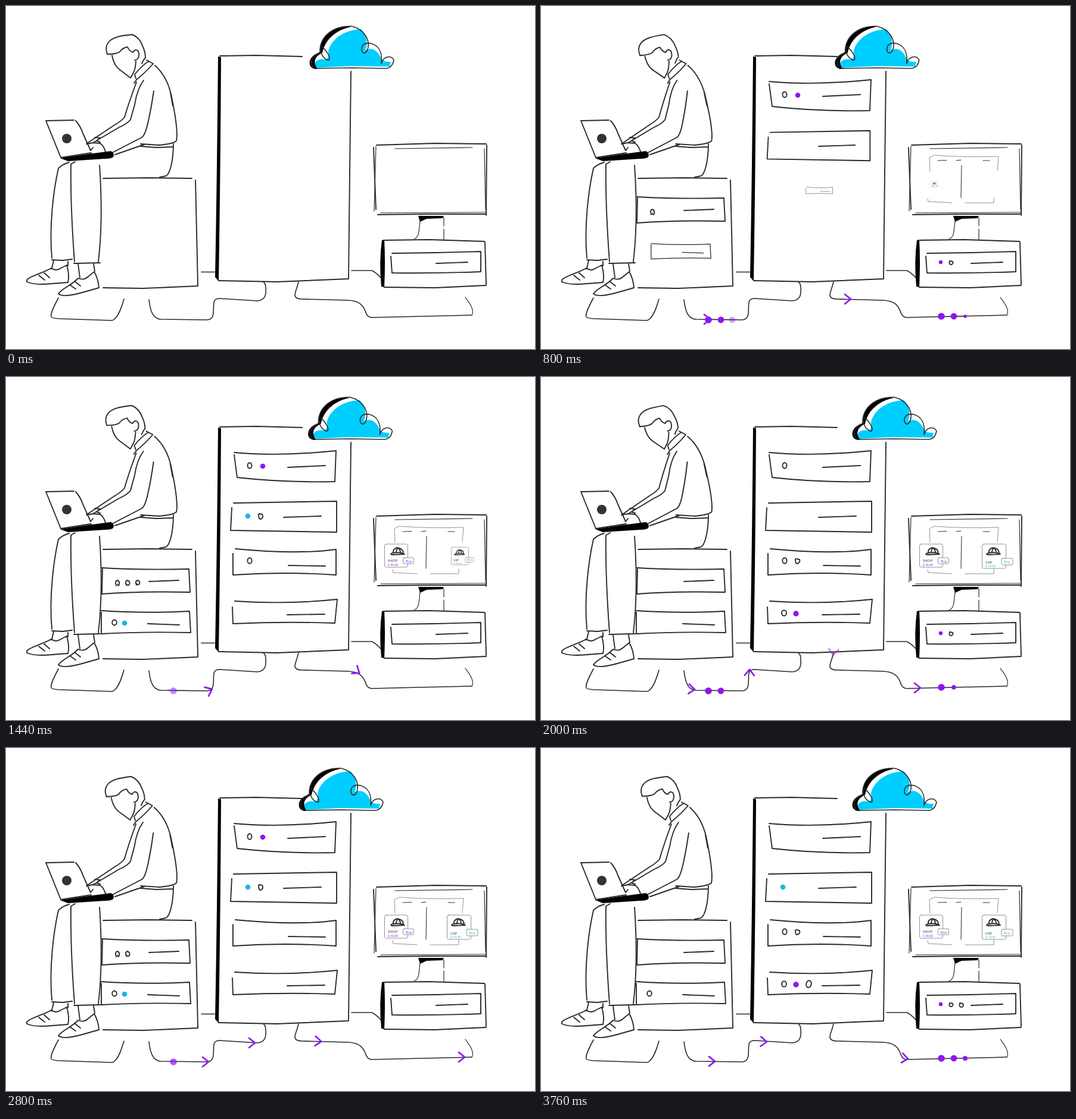
Recreate the animation shown at these times as an HTML page. Size 888 by 577 pixels, loop 3840 ms.

```html
<!DOCTYPE html>
<html lang="en">
<head>
<meta charset="utf-8">
<title>Server room</title>
<style>
html, body { margin: 0; width: 100%; height: 100%; overflow: hidden; background: #fff; }
svg { display: block; width: 888px; height: 577px; }
path, ellipse, rect { fill: none; stroke: #2a2a2a; stroke-width: 1.9; stroke-linecap: round; stroke-linejoin: round; }
.light path { stroke-width: 1.2; }
.cables path { stroke-width: 1.6; }
.fill { fill: #000; stroke: none; }
.thin path, .thin rect { stroke: #777; stroke-width: .8; }
.thin .dark { stroke: #333; stroke-width: 1.1; }
.thin .tag { fill: #fff; }
.purple { fill: #8f16f0; stroke: none; }
.cyan { fill: #18b4e8; stroke: none; }
.arrow { stroke: #8f16f0; stroke-width: 2.7; }
text { font: 6px "Open Sans", sans-serif; fill: #222; }
.price { font-size: 5px; }
</style>
</head>
<body>
<svg viewBox="0 0 888 577">
  <defs>
    <path id="cap" class="dark" d="M-8 -3C-9 -10 -2 -13 2 -11C7 -10 9 -6 9 -2C4 -4 -3 -4 -8 -3ZM-8 -3C-13 -2 -13 0 -9 0L11 -1M0 -11C-3 -9 -3 -6 -3 -4M1 -11C4 -8 4 -6 4 -4"/>
  </defs>

  <g class="cables">
    <path d="M328 447.500H350M580 445H614Q621 448 630 458"/>
    <path d="M88 491C80 506 74 518 76 523Q77 525 88 526L178 529C188 526 194 507 198 493"/>
    <path d="M240 494C242 512 246 526 260 527L338 528C352 527 347 510 349 499Q350 492 358 492L422 496C436 495 437 484 436 474Q436 467 432 464"/>
    <path d="M491 464C488 477 485 481 485 487Q486 493 497 493L574 495C593 496 599 503 603 513Q606 524 614 524L782 520"/>
  </g>
  <g class="light"><path d="M782 520Q784 518 783 511C781 502 775 496 771 490"/></g>

  <!-- box and tower -->
  <path d="M163 290L240 289L312 290M318 293L320 380L322 470M163 474L230 475L322 471"/>
  <path class="fill" d="M356 85L361 86Q360 280 357 463L351 456Q354 300 356 85Z"/>
  <path d="M359 84L420 83L497 85M579 110L577 280L575 459M357 462L455 464L575 459"/>

  <g data-pop="80" data-center="468 150">
    <path d="M383 127Q460 134 554 124L552 176Q470 178 388 169L383 131M473 152L536 149"/>
    <g data-blink="1920 0 1700 0 300">
      <ellipse cx="409" cy="149" rx="3.500" ry="4.800"/>
      <circle class="purple" cx="431" cy="150" r="4.300"/>
    </g>
  </g>
  <g data-pop="355" data-center="466 235">
    <path d="M382 212L555 209V261L377 258L379 220M466 236L529 234"/>
    <g data-blink="1440 840 920 0 280">
      <circle class="cyan" cx="406" cy="234" r="4.300"/>
      <path d="M424 231Q424 240 428 239Q433 236 430 231L425 230"/>
    </g>
  </g>
  <g data-pop="630" data-center="467 310">
    <path d="M385 289Q490 299 554 290V333Q470 327 381 333V297M474 317L536 318"/>
    <g data-blink="1920 1280 1140 0 400">
      <ellipse cx="409" cy="309" rx="3.600" ry="4.800"/>
      <path d="M427 306Q427 315 430 314Q436 312 434 307L429 306"/>
    </g>
  </g>
  <g data-pop="905" data-center="468 395">
    <path d="M384 377Q470 383 556 374L552 414Q470 411 381 415L380 387M472 400L535 399"/>
    <g data-blink="1440 240 1000 0 240 600">
      <ellipse cx="408" cy="397" rx="4" ry="4.800"/>
      <circle class="purple" cx="428" cy="398" r="4.700"/>
      <ellipse cx="449.500" cy="397" rx="4.200" ry="6" transform="rotate(12 449 397)"/>
    </g>
  </g>
  <g data-pop="220" data-center="235 343">
    <path d="M161 321Q230 325 307 323L309 362Q230 360 161 365L162 321M240 344L290 342"/>
    <g data-blink="1920 640 1100 0 200 400">
      <path d="M185 351Q182 343 187 342Q191 343 190 349Q188 353 187 349"/>
      <path d="M202 350Q199 343 204 342Q209 344 207 349Q204 352 203 349"/>
      <path d="M219 350Q216 343 221 342Q226 344 224 348Q221 351 220 348"/>
    </g>
  </g>
  <g data-pop="495" data-center="235 413">
    <path d="M160 393Q230 398 308 394L310 430Q230 428 160 432V396M238 415L291 417"/>
    <g data-blink="1440 840 920 0 280">
      <ellipse cx="182" cy="413" rx="3.800" ry="4.500"/>
      <circle class="cyan" cx="199" cy="414" r="4.300"/>
    </g>
  </g>

  <!-- desktop computer -->
  <path d="M622 234L720 231L806 232M807 234L806 352M624 351L710 350L806 350M617 238L621 342"/>
  <g class="light">
    <path d="M653 240L783 238M629 348L805 347M803 240L805 342M621 236L618 345"/>
    <path d="M695 362C693 378 694 389 685 392M735 356V370M735 375V393"/>
  </g>
  <path class="fill" d="M692 353L735 353L733 357L706 358L695 363Z"/>
  <path class="fill" d="M631 394L635 393Q637 430 635 473L630 472Q626 430 631 394Z"/>
  <path d="M636 394L710 393L803 396M804 397L806 468M635 473L720 474L806 470"/>
  <path d="M648 416L720 415L797 413V447Q720 450 648 449L646 421M722 433L775 431"/>
  <g data-blink="1440 240 1000 0 240 600">
    <circle class="purple" cx="671" cy="431" r="3.300"/>
    <path d="M686 429Q684 435 689 435Q693 433 691 430L687 429"/>
    <path d="M703 429Q701 436 706 436Q711 434 708 430L704 429"/>
  </g>

  <!-- web shop -->
  <g class="thin">
    <g data-pop="160" data-center="709 291">
      <path d="M653 278L652 255L660 251Q710 255 768 253L766 277M649 324L650 329L690 331M712 331L760 331V323"/>
      <path class="dark" d="M706 268L705 322M666 260L681 259.500M697 260L705 259M742 260H753"/>
    </g>
    <g data-pop="635" data-center="661 300">
      <rect x="635.500" y="281" width="39" height="39" rx="3"/>
      <use href="#cap" x="658" y="299"/>
      <text x="641" y="311">SHOP</text>
      <text x="641" y="318" class="price purple">$ 30.00</text>
      <rect class="tag" x="666.500" y="304" width="18" height="10" rx="2"/>
      <text x="671" y="311.500" class="purple">Buy</text>
    </g>
    <g data-pop="1115" data-center="766 300">
      <rect x="740.500" y="281" width="40" height="41" rx="3"/>
      <use href="#cap" x="760" y="299"/>
      <text x="746" y="314">CAP</text>
      <text x="746" y="320" class="price cyan">$ 10.00</text>
      <rect class="tag" x="773" y="305" width="19" height="11" rx="2"/>
      <text x="777" y="312.500" class="cyan">Buy</text>
    </g>
  </g>

  <!-- man with laptop -->
  <g id="head">
    <path d="M170 81C167 73 168 66 172 61C179 52 193 50 212 48C222 52 227 60 230 69Q234 78 234 87Q231 90 228 97"/>
    <path d="M170 81Q186 81 191 77Q196 70 204 69Q207 76 213 78Q217 71 222 76C225 84 222 91 216 91"/>
    <path d="M178 83C181 99 187 105 196 111L209 121L214 112Q217 107 218 93"/>
  </g>
  <g id="torso">
    <path d="M236 91L247 97Q235 111 219 124L215 130M240 93Q230 98 216 115L218 122"/>
    <path d="M250 100C267 115 275 134 279 158C285 188 289 213 286 227Q280 232 257 234L226 232M276 146L280 168"/>
    <path d="M219 128Q206 163 199 187Q193 194 184 199L136 231M231 125Q220 140 216 166L209 191Q204 198 190 204L146 230"/>
    <path d="M248 143Q244 171 239 193Q234 217 228 221L176 248"/>
  </g>
  <path d="M226 236L252 238L280 237M281 232C281 260 275 284 268 286L258 288M232 233L183 250"/>
  <path d="M149 221L158 222L152 227L158 229M135 232L146 230L158 231Q164 235 167 245M146 238L142 243"/>
  <path d="M67 193L92 255L143 247M67 193L114 192M117 193Q125 202 129 214L142 243"/>
  <circle cx="102" cy="223" r="8" fill="#333"/>
  <path class="fill" d="M91 256L138 249L176 244Q183 248 180 254Q177 257 166 257L104 261Z"/>
  <path d="M106 263Q95 266 88 273C80 308 72 370 77 424M116 262L109 266C108 330 112 390 115 430"/>
  <path d="M157 268C161 326 161 380 155 430M77 427L95 428L111 426M114 433L158 432"/>
  <path d="M80 428L77 441M104 430L104 437M121 434L124 457M147 434L149 446"/>
  <path d="M35 461C39 454 63 449 76 441Q84 447 92 441L102 436Q107 453 104 465L78 467Q48 470 35 464ZM55 453L65 461M64 449L73 457"/>
  <path d="M88 484C94 475 110 470 121 458Q130 462 137 456L148 447Q155 459 156 474L128 482Q96 491 88 484ZM107 469L117 476M115 463L125 471"/>

  <g id="arrows"></g>
  <g id="dots"></g>

  <g id="cloud">
    <path style="fill:#fff;stroke:none" d="M514 104Q508 88 527 79C526 52 548 34 580 34C600 38 609 54 608 64Q628 66 630 95Q640 80 651 92Q648 105 638 105Z"/>
    <path style="fill:#00ceff;stroke:none" d="M519 104C515 93 525 88 535 90Q543 90 541 76C545 58 565 40 596 39C608 52 607 66 603 74Q621 67 630 89Q632 94 646 94L644 102L580 101Z"/>
    <path class="fill" d="M523 106C505 108 504 84 527 78C526 52 548 33 580 35C555 40 536 55 531 79C519 84 514 94 523 106Z"/>
    <g class="cables">
      <path d="M516 104Q506 88 527 78C526 52 548 33 580 34C601 39 610 56 608 69C606 80 600 82 597 75C596 64 604 61 613 63C627 67 632 80 630 97C634 83 647 83 651 91Q649 103 639 105L580 104L520 105"/>
      <path d="M528 67C537 73 546 86 542 91C535 91 528 82 528 72"/>
    </g>
  </g>
</svg>
<script>
const LOOP = 3840, STEP = 80, POP = 500;
const $ = id => document.getElementById(id);
const clamp = x => Math.max(0, Math.min(1, x));
const ease = x => (1 - Math.cos(Math.PI * clamp(x))) / 2;
const mod = (a, n) => ((a % n) + n) % n;

function add(parent, tag, attrs) {
  const el = document.createElementNS("http://www.w3.org/2000/svg", tag);
  for (const key in attrs) el.setAttribute(key, attrs[key]);
  return parent.appendChild(el);
}

const pops = [...document.querySelectorAll("[data-pop]")].map(el => ({
  el, start: +el.dataset.pop, center: el.dataset.center.split(" ")
}));
// data-blink: period, offset, time off, then the time each light comes on
const blinks = [...document.querySelectorAll("[data-blink]")].map(el => {
  const [period, offset, off, ...on] = el.dataset.blink.split(" ").map(Number);
  return { el, period, offset, off, on };
});

// Arrow routes: time since birth, x, y, heading
const routes = [
  { first: 240, period: 1440, keys: [
    [0, 240, 496, 85], [160, 243, 514, 65], [320, 253, 525, 5], [560, 279, 527, 0],
    [1120, 335, 528, 0], [1220, 343, 527, -30], [1420, 349, 516, -85], [1760, 350, 497, -88],
    [1860, 354, 493, -30], [2080, 374, 494, 3], [2560, 413, 496, 0], [2860, 431, 490, -50],
    [3200, 433, 470, -90], [3300, 433, 464, -95]] },
  { first: 0, period: 1920, keys: [
    [0, 491, 461, 100], [80, 491, 463, 95], [440, 486, 484, 80], [600, 495, 492, 20],
    [800, 515, 493, 0], [1440, 589, 495, 35], [1520, 596, 499, 55], [1700, 604, 515, 60],
    [1840, 611, 522, 8], [2000, 632, 523, 0], [2800, 765, 520, 0], [2920, 781, 516, -50],
    [3080, 780, 500, -110]] }
];
for (const route of routes)
  route.arrows = [0, 1, 2].map(() => add($("arrows"), "path", { class: "arrow", d: "M-5 -8L5 0L-5 8" }));

const dotRow = (xs, y, radii) => xs.map((cx, i) =>
  add($("dots"), "circle", { class: "purple", cx, cy: y, r: radii[i] }));
const leftDots = dotRow([281, 302, 321], 528, [5.8, 5.4, 5.2]);
const rightRadii = [5.8, 5.4, 4];
const rightDots = dotRow([672, 693, 712], 522, rightRadii);

function placeArrow(el, keys, age) {
  const end = keys[keys.length - 1][0];
  if (age < 0 || age >= end) return el.setAttribute("opacity", 0);
  const i = keys.findIndex(key => key[0] > age);
  const a = keys[i - 1], b = keys[i], f = (age - a[0]) / (b[0] - a[0]);
  const [, x, y, angle] = a.map((v, n) => v + (b[n] - v) * f);
  el.setAttribute("transform", `translate(${x} ${y}) rotate(${angle})`);
  el.setAttribute("opacity", Math.min(1, age / 160, (end - age) / 160));
}

function draw(t) {
  for (const { el, start, center: [x, y] } of pops) {
    const s = ease((t - start) / POP);
    el.setAttribute("visibility", s ? "visible" : "hidden");
    el.setAttribute("transform", `translate(${x} ${y}) scale(${s}) translate(${-x} ${-y})`);
  }
  for (const { el, period, offset, off, on } of blinks) {
    const phase = mod(t - offset, period);
    [...el.children].forEach((light, i) =>
      light.setAttribute("display", phase >= on[i] && phase < off ? "inline" : "none"));
  }
  for (const { first, period, keys, arrows } of routes)
    arrows.forEach((el, i) => placeArrow(el, keys, t - first - i * period));

  const left = t % 1320, right = mod(t - 240, 1440);
  leftDots.forEach((el, i) =>
    el.setAttribute("opacity", left < 1040 ? clamp((left - 20 - 350 * i) / 200) : 0));
  rightDots.forEach((el, i) =>
    el.setAttribute("r", right < 1000 ? rightRadii[i] * Math.sqrt(clamp((right - 240 * i) / 160)) : 0));

  // The cloud leaves its rest position, then swings
  const swing = t < 960 ? -18 * ease(t / 1000) : -2.5 + 16 * Math.cos(t / 960 * Math.PI);
  $("cloud").setAttribute("transform", `translate(${swing} 0)`);

  // The man nods; his upper body leans along
  const nod = (1 - Math.cos(t / 640 * Math.PI)) / 2;
  $("head").setAttribute("transform", `translate(${-2 * nod} 0) rotate(${-3.5 * nod} 212 120)`);
  $("torso").setAttribute("transform", `translate(0 215) skewX(${2 * nod}) translate(0 -215)`);
}

function tick() {
  draw(Math.floor(performance.now() % LOOP / STEP) * STEP);
  requestAnimationFrame(tick);
}
tick();
</script>
</body>
</html>
```
